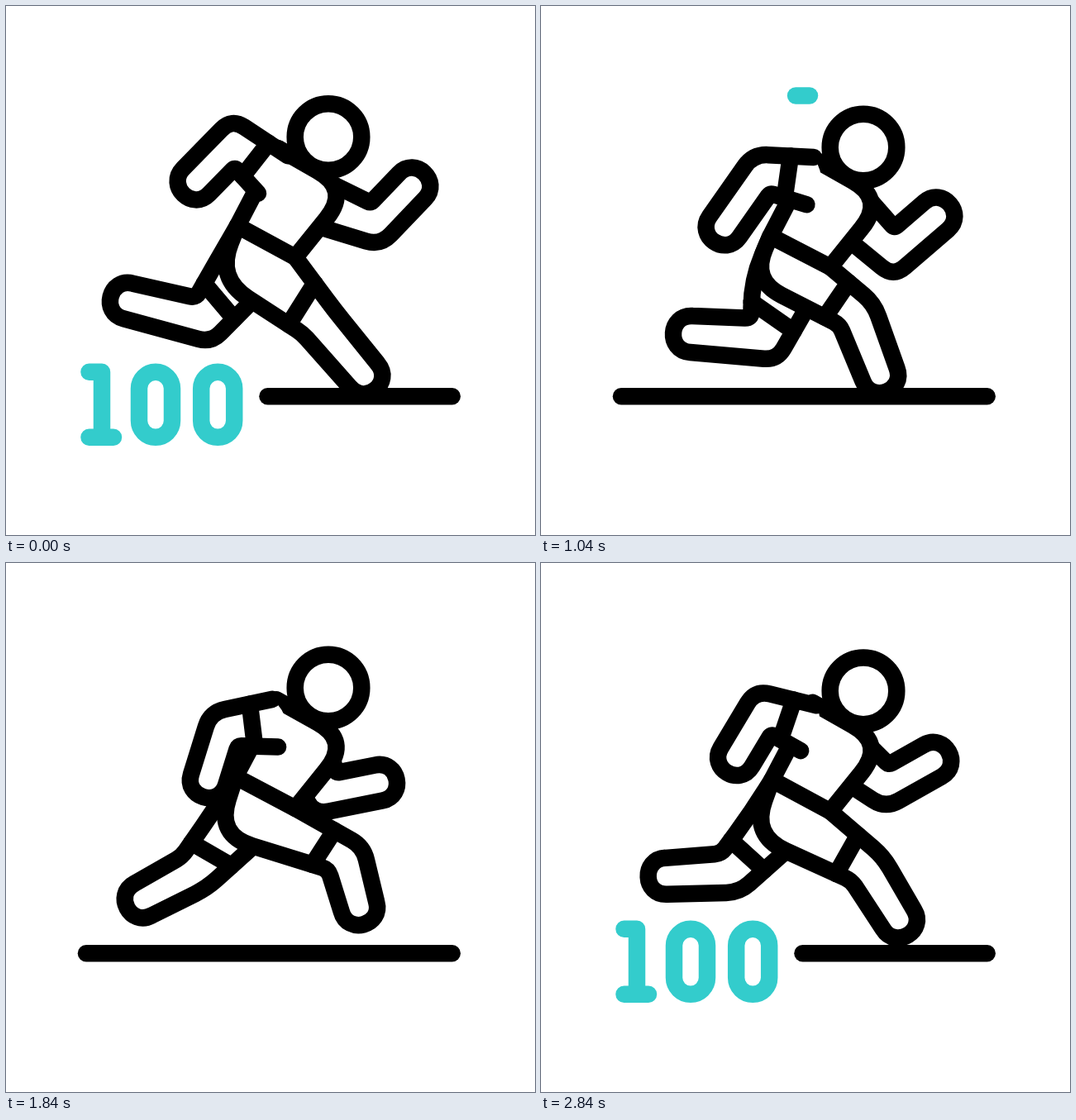
An HTML page with a canvas for the animation above (2.88 s loop, 640x640 px).

```html
<!DOCTYPE html>
<html lang="en">
<head>
<meta charset="utf-8">
<title>Sprint</title>
<style>
html, body { margin: 0; width: 100%; height: 100%; overflow: hidden; background: #fff; }
canvas { display: block; width: 640px; height: 640px; }
</style>
</head>
<body>
<canvas id="stage" width="640" height="640"></canvas>
<script>
const ctx = document.getElementById('stage').getContext('2d');
const LOOP = 2880, STRIDE = 960, STEP = 40;
const INK = '#000', TEAL = '#33cccc', LINE = 20.5;

// Key points by stride time in ms; the opposite limb runs half a stride later.
const legKeys = { // knee, ankle
  0: [378, 382, 433, 447],
  80: [382, 373, 410, 446],
  240: [283, 383, 252, 448],
  400: [228, 374, 166, 407],
  480: [239, 380, 148, 357],
  560: [270, 403, 182, 397],
  720: [417, 351, 397, 409],
  880: [411, 357, 427, 416]
};
const armKeys = { // elbow, hand
  0: [275, 166, 230, 212],
  80: [267, 203, 222, 267],
  240: [331, 264, 379, 303],
  400: [386, 279, 451, 266],
  480: [447, 264, 491, 218],
  560: [427, 298, 478, 254],
  720: [286, 229, 290, 258],
  880: [264, 201, 245, 262]
};

const add = (a, b, k = 1) => [a[0] + b[0] * k, a[1] + b[1] * k];
const sub = (a, b) => add(a, b, -1);
const mid = (a, b) => [(a[0] + b[0]) / 2, (a[1] + b[1]) / 2];
const size = a => Math.hypot(a[0], a[1]);
const unit = a => [a[0] / (size(a) || 1), a[1] / (size(a) || 1)];
const frontOf = a => [a[1], -a[0]];
const toward = (from, to, distance) => add(from, unit(sub(to, from)), distance);
const clamp = x => Math.max(0, Math.min(1, x));
const wave = t => Math.cos(2 * Math.PI * t / STRIDE);

// Periodic smooth interpolation through key points.
function track(keys) {
  const times = Object.keys(keys).map(Number);
  const n = times.length;
  const timeAt = i => times[(i + n) % n] + Math.floor(i / n) * STRIDE;
  return time => {
    const t = time % STRIDE;
    let i = n - 1;
    while (times[i] > t) i--;
    const [ta, tb, tc, td] = [-1, 0, 1, 2].map(k => timeAt(i + k));
    const [a, b, c, d] = [-1, 0, 1, 2].map(k => keys[times[(i + k + n) % n]]);
    const span = tc - tb, u = (t - tb) / span;
    const v = b.map((from, j) => {
      const to = c[j];
      const m0 = (to - a[j]) / (tc - ta) * span;
      const m1 = (d[j] - from) / (td - tb) * span;
      return from + u * (m0 + u * (3 * (to - from) - 2 * m0 - m1 + u * (2 * (from - to) + m0 + m1)));
    });
    return [[v[0], v[1]], [v[2], v[3]]];
  };
}
const legAt = track(legKeys), armAt = track(armKeys);

// The body bobs twice per stride.
function bodyAt(t) {
  const a = 4 * Math.PI * t / STRIDE;
  const bob = 1.67 * (1 - Math.cos(2 * a)) + 15 * Math.sin(a) - 3.5 * Math.sin(2 * a);
  return {
    bob,
    head: [390, 158.5 + bob],
    shoulder: [325 + 4 * Math.cos(a), 172 + 0.9 * bob],
    chest: [416, 222 + 0.95 * bob],
    frontWaist: [350, 304 + 0.95 * bob],
    backWaist: [275 + 5 * Math.cos(a), 266 + bob]
  };
}

// Polyline whose inner points are softened by the given amounts.
function trace(path, points, softness) {
  path.lineTo(...points[0]);
  for (let i = 1; i < points.length - 1; i++) {
    const [prev, p, next] = points.slice(i - 1, i + 2);
    const cut = Math.min(softness[i - 1], 0.7 * size(sub(prev, p)), 0.7 * size(sub(next, p)));
    path.lineTo(...toward(p, prev, cut));
    path.quadraticCurveTo(...p, ...toward(p, next, cut));
  }
  path.lineTo(...points[points.length - 1]);
}

// Half-round end of a hand or foot.
function roundEnd(path, a, b) {
  const out = frontOf(sub(b, a));
  path.bezierCurveTo(...add(a, out, 0.667), ...add(b, out, 0.667), ...b);
}

// Outer corners of a bent limb of even thickness.
function limbCorners(root, joint, tip, jointWidth) {
  const lower = unit(sub(tip, joint));
  const bend = add(unit(sub(joint, root)), lower);
  const miter = frontOf(bend), k = 2 * jointWidth / Math.max(1, size(bend) ** 2);
  return {
    frontJoint: add(joint, miter, k), backJoint: add(joint, miter, -k),
    frontTip: add(tip, frontOf(lower), 22), backTip: add(tip, frontOf(lower), -22)
  };
}

function segment(a, b) {
  ctx.beginPath();
  ctx.moveTo(...a);
  ctx.lineTo(...b);
  ctx.stroke();
}

function paint(path) {
  ctx.fill(path);
  ctx.stroke(path);
}

function drawLeg(t, body) {
  const { frontWaist, backWaist } = body;
  const [knee, ankle] = legAt(t);
  const c = limbCorners(mid(frontWaist, backWaist), knee, ankle, 24);
  const seat = [255, 319 + 20 * wave(t - 800) + body.bob];
  const path = new Path2D();
  trace(path, [frontWaist, c.frontJoint, c.frontTip], [16]);
  roundEnd(path, c.frontTip, c.backTip);
  trace(path, [c.backTip, c.backJoint, seat, backWaist], [8, 45]);
  paint(path);
  segment(toward(c.frontJoint, frontWaist, 40), toward(c.backJoint, seat, 20));
}

function drawArm(t, body) {
  const [elbow, hand] = armAt(t);
  const root = [343 - 20 * wave(t), body.shoulder[1] + 35 - 14 * wave(t) + 11 * wave(2 * t)];
  const upper = unit(sub(elbow, root));
  const front = add(root, frontOf(upper), 29), back = add(root, frontOf(upper), -29);
  const c = limbCorners(root, elbow, hand, 22);
  const path = new Path2D();
  trace(path, [front, c.frontJoint, c.frontTip], [4]);
  roundEnd(path, c.frontTip, c.backTip);
  trace(path, [c.backTip, c.backJoint, back], [18]);
  const inside = new Path2D(path);
  inside.quadraticCurveTo(...add(root, upper, -26), ...front);
  ctx.fill(inside);
  ctx.stroke(path);
  segment(toward(front, c.frontJoint, 28), toward(back, c.backJoint, 28));
}

function drawTorso({ shoulder, chest, frontWaist, backWaist }) {
  const path = new Path2D();
  trace(path, [shoulder, chest, frontWaist, backWaist], [45, 0]);
  path.closePath();
  paint(path);
}

function drawRunner(t) {
  const body = bodyAt(t), opposite = t + STRIDE / 2;
  ctx.strokeStyle = INK;
  ctx.fillStyle = '#fff';
  drawArm(opposite, body);
  drawLeg(opposite, body);
  drawLeg(t, body);
  drawTorso(body);
  drawArm(t, body);
  const head = new Path2D();
  head.arc(...body.head, 40.3, 0, Math.PI * 2);
  paint(head);
}

// A streak grows leftwards, then its right end follows.
function drawStreak(t, y, right, left, growStart, growEnd, shrinkStart, shrinkEnd) {
  if (t < growStart || t > shrinkEnd) return;
  const along = (a, b) => right + (left - right) * clamp((t - a) / (b - a));
  segment([along(growStart, growEnd), y], [along(shrinkStart, shrinkEnd), y]);
}

function drawStreaks(t) {
  ctx.strokeStyle = TEAL;
  drawStreak(t, 108.5, 325, 98, 52, 428, 390, 683);
  drawStreak(t, 204.5, 179, 40, 213, 590, 550, 845);
  drawStreak(t, 243, 187, 48, 154, 486, 483, 780);
}

function drawNumber(shown) {
  if (!shown) return;
  ctx.save();
  ctx.globalAlpha = Math.min(1, shown * 2);
  ctx.translate(-70 * (1 - shown), 0);
  ctx.strokeStyle = TEAL;
  const digits = new Path2D('M100.5 442.8H116V521.8M100.5 521.8H130');
  for (const x of [161, 236.2]) digits.roundRect(x, 442.8, 40, 79, 20);
  ctx.stroke(digits);
  ctx.restore();
}

function draw(t) {
  const shown = t < LOOP / 2 ? 1 - clamp(t / 400) : clamp((t - 2180) / 400);
  ctx.fillStyle = '#fff';
  ctx.fillRect(0, 0, 640, 640);
  ctx.lineWidth = LINE;
  ctx.lineCap = ctx.lineJoin = 'round';
  drawStreaks(t % STRIDE);
  drawNumber(shown);
  ctx.strokeStyle = INK;
  segment([97 + 219.5 * shown, 472.2], [539.7, 472.2]);
  drawRunner(t % STRIDE);
}

function tick() {
  draw(Math.floor(performance.now() % LOOP / STEP) * STEP);
  requestAnimationFrame(tick);
}
tick();
</script>
</body>
</html>
```
